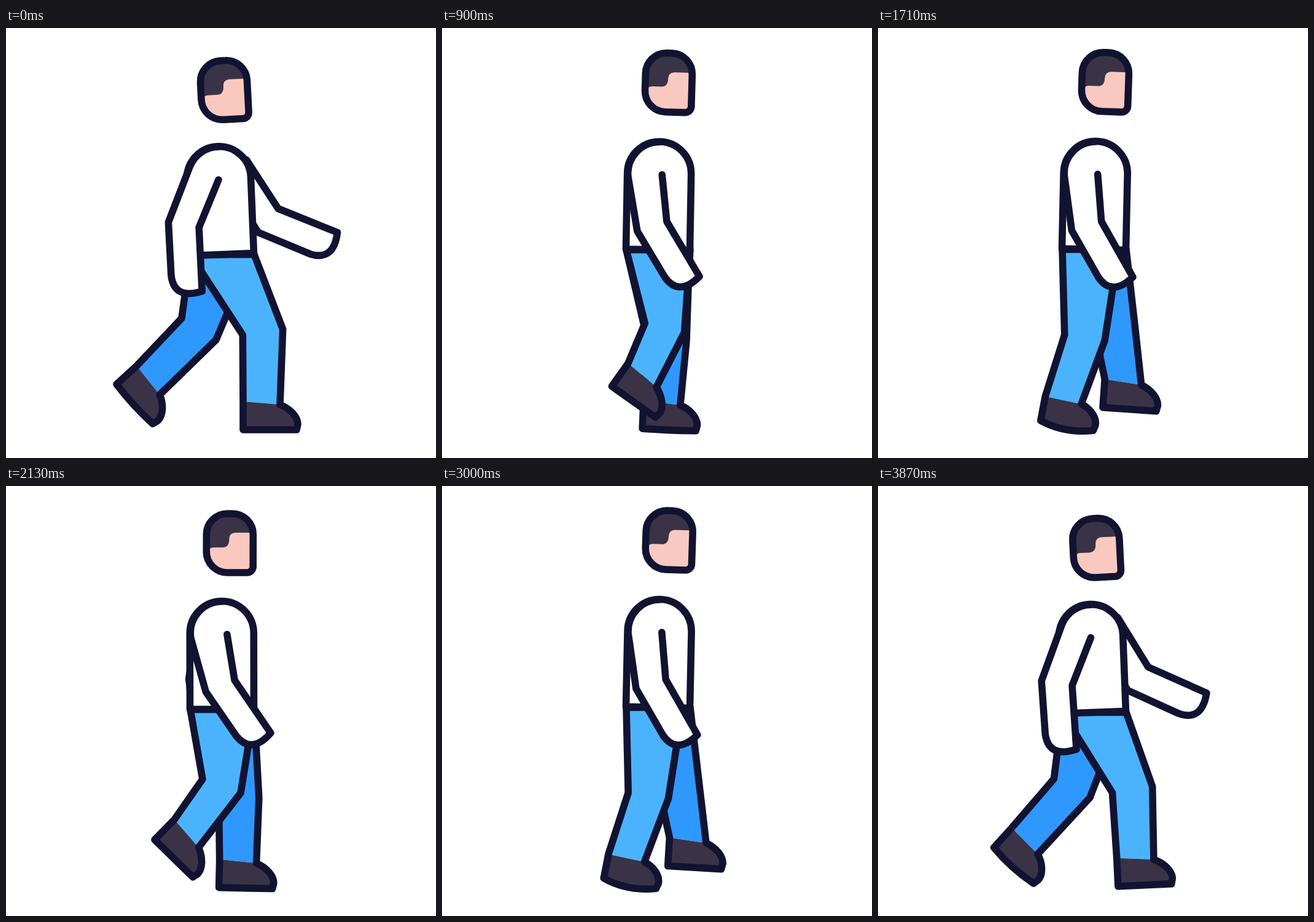
These frames come from a looping animation (700x700 px, 3900 ms). An HTML page:

```html
<!DOCTYPE html>
<html lang="en">
<head>
<meta charset="utf-8">
<title>Walking man</title>
<style>
  html, body { margin: 0; width: 100%; height: 100%; overflow: hidden; background: #fff; }
  svg { display: block; width: 100vw; height: 100vh; }
  .line { fill: none; stroke: #121331; stroke-width: 11.6; stroke-linejoin: round; stroke-linecap: round; }
  .white { fill: #fff; }
  .near { fill: #4bb3fd; }
  .far { fill: #2f98ff; }
  .dark { fill: #3a3347; }
  .skin { fill: #f9c9c0; }
</style>
</head>
<body>
<svg id="stage" viewBox="0 0 700 700"></svg>
<script>
const stage = document.getElementById('stage');
const LOOP = 3900, STEP = 30;
const STRIDES = [0, 1320, 2600, LOOP];

const rad = deg => deg * Math.PI / 180;
const mix = (a, b, u) => a + (b - a) * u;
const pt = ([x, y]) => x.toFixed(2) + ' ' + y.toFixed(2);
const poly = points => 'M' + points.map(pt).join('L');

// Straight move from a to b, bent by a hump in the middle and a skew early or late.
const bend = (a, b, u, hump, skew) =>
  mix(a, b, u) + hump * Math.sin(Math.PI * u) + skew * Math.sin(2 * Math.PI * u);

// Rotates a local point by deg and moves it to an origin.
function place([ox, oy], deg, x, y) {
  const c = Math.cos(rad(deg)), s = Math.sin(rad(deg));
  return [ox + x * c - y * s, oy + x * s + y * c];
}

// Point measured along a limb (angle from straight down) and across to its back.
const limb = (origin, deg, along, back) => place(origin, -deg, -back, along);

function add(parent, tag, cls, d) {
  const el = document.createElementNS('http://www.w3.org/2000/svg', tag);
  if (cls) el.setAttribute('class', cls);
  if (d) el.setAttribute('d', d);
  return parent.appendChild(el);
}
const path = (cls, d) => add(stage, 'path', cls, d);
const set = (el, d) => el.setAttribute('d', d);

const makeLeg = cls => ({ pants: path(cls), shoe: path('dark'), line: path('line') });
const makeArm = () => ({ fill: path('white'), line: path('line') });

const farArm = makeArm();
const farLeg = makeLeg('far');
const nearLeg = makeLeg('near');
const torso = add(stage, 'g');
const TORSO = 'M-52 0V-124A52 52 0 0 1 52 -124V0Z';
add(torso, 'path', 'white', TORSO);
add(torso, 'path', 'line', TORSO);
const head = add(stage, 'g');
const CROWN = 'M-38 14V-14A34 34 0 0 1 -4 -48H4A34 34 0 0 1 38 -14';
const FACE = CROWN + 'V38A10 10 0 0 1 28 48H-4A34 34 0 0 1 -38 14Z';
add(head, 'path', 'skin', FACE);
add(head, 'path', 'dark', CROWN + 'V-17H10Q-1 -17 -1 -6Q-1 7 -12 7H-26Q-33 7 -38 14Z');
add(head, 'path', 'line', FACE);
const nearArm = makeArm();

// Half the cycle carries the leg from contact to lift-off, the other half swings it back.
function legPose(phase) {
  const u = phase * 2 % 1;
  const move = (contact, lift, stance, swing) => phase < .5
    ? bend(contact, lift, u, ...stance)
    : bend(lift, contact, u, ...swing);
  return {
    knee: [move(418, 314, [-18, 2], [10, 2]), move(495, 490, [13, 0], [-4, 0])],
    tilt: move(-8, 32, [-4, 7], [-9, 5]),
    heel: [move(386, 180, [10, 8], [46, -27]), move(654, 580, [30, -3], [-16, -12])],
    turn: move(0, 47.5, [-18, 2], [-6, 14])
  };
}

function drawLeg(leg, phase, hipY) {
  const { knee, tilt, heel, turn } = legPose(phase);
  const push = Math.exp(-(((phase - .364) / .11) ** 2));
  const kneeSide = side => place(knee, tilt, side * 33, 0);
  const foot = (x, y) => place(heel, turn, x, y);
  const cuffBack = foot(0, 8 * push - 46), cuffFront = foot(60, 3 * push - 41);
  const shoe = `C${pt(foot(77, -34))} ${pt(foot(89, -21))} ${pt(foot(89, -9))}` +
    `L${pt(foot(87, 0))}Q${pt(foot(42, 18 * push))} ${pt(heel)}L${pt(cuffBack)}`;
  const pants = poly([kneeSide(-1), [300, hipY], [404 - 16 * push, hipY], kneeSide(1), cuffFront]);
  set(leg.pants, pants + `L${pt(cuffBack)}Z`);
  set(leg.shoe, `M${pt(cuffFront)}${shoe}Z`);
  set(leg.line, pants + shoe + 'Z');
}

// Front of the arm from shoulder to hand, then back up to the elbow.
function armPath(shoulder, elbow, upper, fore) {
  const f = (along, back) => pt(limb(elbow, fore, along, back));
  const backElbow = limb(elbow, (upper + fore) / 2, 0, 50.5);
  return {
    backElbow,
    d: poly([shoulder, elbow]) + `L${f(104, 0)}C${f(112, 30)} ${f(103, 47)} ${f(76, 49)}L${pt(backElbow)}`
  };
}

function drawFarArm(reach, ease) {
  const elbow = [mix(443, 316, reach), mix(294, 322, reach)];
  const upper = mix(33, -22, reach);
  const arm = armPath(limb(elbow, upper, -95, 0), elbow, upper, mix(68, 1, ease));
  const d = arm.d + `L${pt(limb(arm.backElbow, upper, -80, 0))}`;
  set(farArm.fill, d + 'Z');
  set(farArm.line, d);
}

function drawNearArm(ease, bob, dome) {
  const upper = mix(-22.3, 12, ease);
  const shoulder = [mix(346, 361, ease), 242 + 5 * bob];
  const elbow = limb(shoulder, upper, mix(84, 75, ease), 0);
  const arm = armPath(shoulder, elbow, upper, mix(2.8, 37, ease));
  const d = arm.d + `L${pt(limb(dome, upper, 0, 51))}A51.5 51.5 0 0 1 ${pt([dome[0], dome[1] - 51.5])}`;
  set(nearArm.fill, d + 'Z');
  set(nearArm.line, d);
}

function draw(ms) {
  const t = Math.floor((ms % LOOP) / STEP) * STEP;
  const i = STRIDES.findIndex(end => end > t);
  const phase = (t - STRIDES[i - 1]) / (STRIDES[i] - STRIDES[i - 1]);
  const bob = Math.cos(4 * Math.PI * phase);
  const hipY = 364 + 4.7 * bob;
  const lean = -.3 - 2 * bob;
  const there = 1 - Math.abs(1 - 2 * phase);
  const ease = bend(0, 1, there, .107, -.11);

  drawFarArm(bend(0, 1, there, -.05, -.05), ease);
  drawLeg(farLeg, (phase + .5) % 1, hipY);
  drawLeg(nearLeg, phase, hipY);
  torso.setAttribute('transform', `translate(351.5 ${hipY}) rotate(${lean})`);
  head.setAttribute('transform',
    `translate(${363.5 - 8.3 * bob} ${93.7 + 7.4 * bob}) rotate(${-.2 - 2.8 * bob})`);
  drawNearArm(ease, bob, place([351.5, hipY], lean, 0, -124));
}

let start;
function tick(now) {
  start ??= now;
  draw(now - start);
  requestAnimationFrame(tick);
}
draw(0);
requestAnimationFrame(tick);
</script>
</body>
</html>
```
